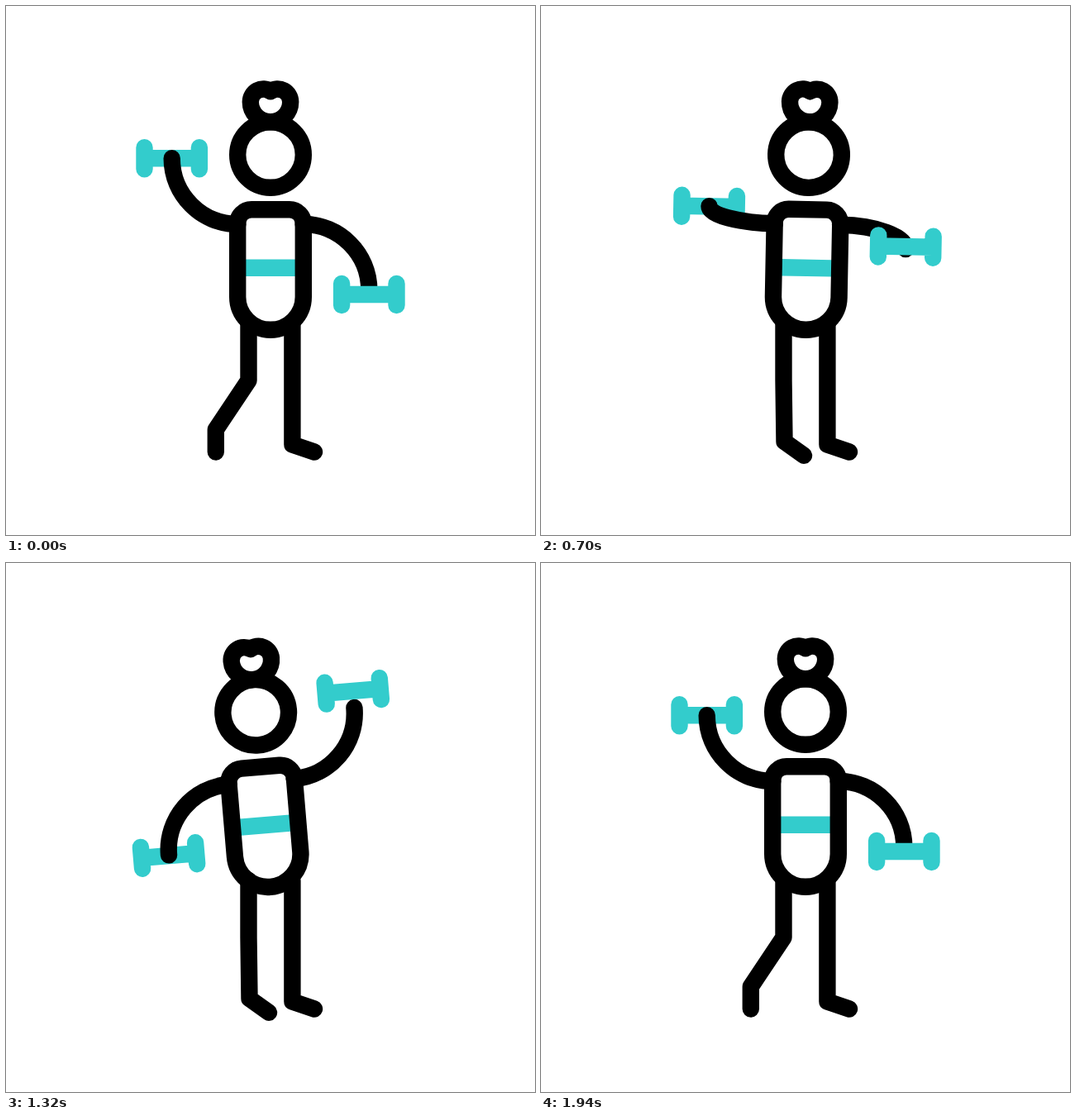
Animation, 640 px wide and 640 px high, one loop 2.4 s. Source, as an HTML page:

```html
<!DOCTYPE html>
<html>
<head>
<meta charset="utf-8">
<style>
html, body { margin: 0; height: 100%; overflow: hidden; background: #fff; }
svg { display: block; width: 100vw; height: 100vh; }
path, circle { fill: none; stroke: #000; stroke-width: 20.4; stroke-linecap: round; stroke-linejoin: round; }
.teal { stroke: #33cccc; }
</style>
</head>
<body>
<svg viewBox="0 0 640 640">
  <path d="M346.4 384V530.5L373 539.5"/>
  <path id="leg"/>
  <g id="body">
    <path class="teal" d="M290 316.8H350"/>
    <path id="bellL" class="teal" d="M-33.2 -13V13M33.2 -13V13M-33.2 0H33.2"/>
    <path id="armL"/>
    <path id="armR"/>
    <path id="bellR" class="teal" d="M-33.2 -13V13M33.2 -13V13M-33.2 0H33.2"/>
    <path d="M297 246.2H343A16.8 16.8 0 0 1 359.8 263V352A39.8 39.8 0 0 1 280.2 352V263A16.8 16.8 0 0 1 297 246.2Z"/>
    <circle cx="320" cy="180" r="39.8"/>
    <path d="M320 103.2A15.5 15.5 0 0 0 295.8 116A24.2 24.2 0 0 0 344.2 116A15.5 15.5 0 0 0 320 103.2Z"/>
  </g>
</svg>
<script>
const LOOP = 2400, STEP = 20, END = 1940;
const SHOULDER = 264, REACH = 79.7;   // each arm is a quarter circle at either end of its swing
const LAG = 17;                       // the left arm trails the right one
const armBeats = [0, 405, 882, 1317, 1755];
const tiltBeats = [0, 441, 940, 1487, END];
const tilts = [0, -6.1, 7.5, -8.35, 0];

const $ = id => document.getElementById(id);
const mix = (a, b, p) => a + (b - a) * p;

function ease(x) {
  x = Math.min(1, Math.max(0, x));
  return x * x * (3 - 2 * x);
}

// Eases from value(i) to value(i + 1) between neighbouring beats.
function swing(t, beats, value) {
  const i = beats.findLastIndex(b => b <= t);
  if (i === beats.length - 1) return value(i);
  return mix(value(i), value(i + 1), ease((t - beats[i]) / (beats[i + 1] - beats[i])));
}

// side is -1 for left, 1 for right; drop runs from -1 (raised) to 1 (lowered).
function poseArm(name, side, drop, bellY) {
  const x = d => 320 + side * d;
  const hand = x(39.6 + REACH), y = SHOULDER + REACH * drop;
  $("arm" + name).setAttribute("d",
    `M${x(39.6)} ${SHOULDER}C${x(83.6)} ${SHOULDER} ${hand} ${mix(SHOULDER, y, 0.448)} ${hand} ${y}`);
  $("bell" + name).setAttribute("transform", `translate(${hand} ${bellY})`);
}

function draw(now) {
  const t = Math.floor(now % LOOP / STEP) * STEP;
  const left = swing(Math.max(0, t - LAG), armBeats, i => i % 2);
  const right = swing(t, armBeats, i => i % 2);
  const bend = 1 - ease(t / 385) + ease((t - 1532) / (END - 1532));

  $("body").setAttribute("transform", `rotate(${swing(t, tiltBeats, i => tilts[i])} 320 392)`);
  poseArm("L", -1, mix(-1, 1, left), mix(184.3, 344.3, left));
  poseArm("R", 1, mix(1, -1, right), mix(349, 164.1, right));
  $("leg").setAttribute("d",
    `M293.5 384V453L${mix(294.5, 253.8, bend)} ${mix(527, 512.5, bend)}L${mix(318, 253.8, bend)} ${mix(543.8, 539.5, bend)}`);
}

const start = performance.now();
function tick() {
  draw(performance.now() - start);
  requestAnimationFrame(tick);
}
tick();
</script>
</body>
</html>
```
